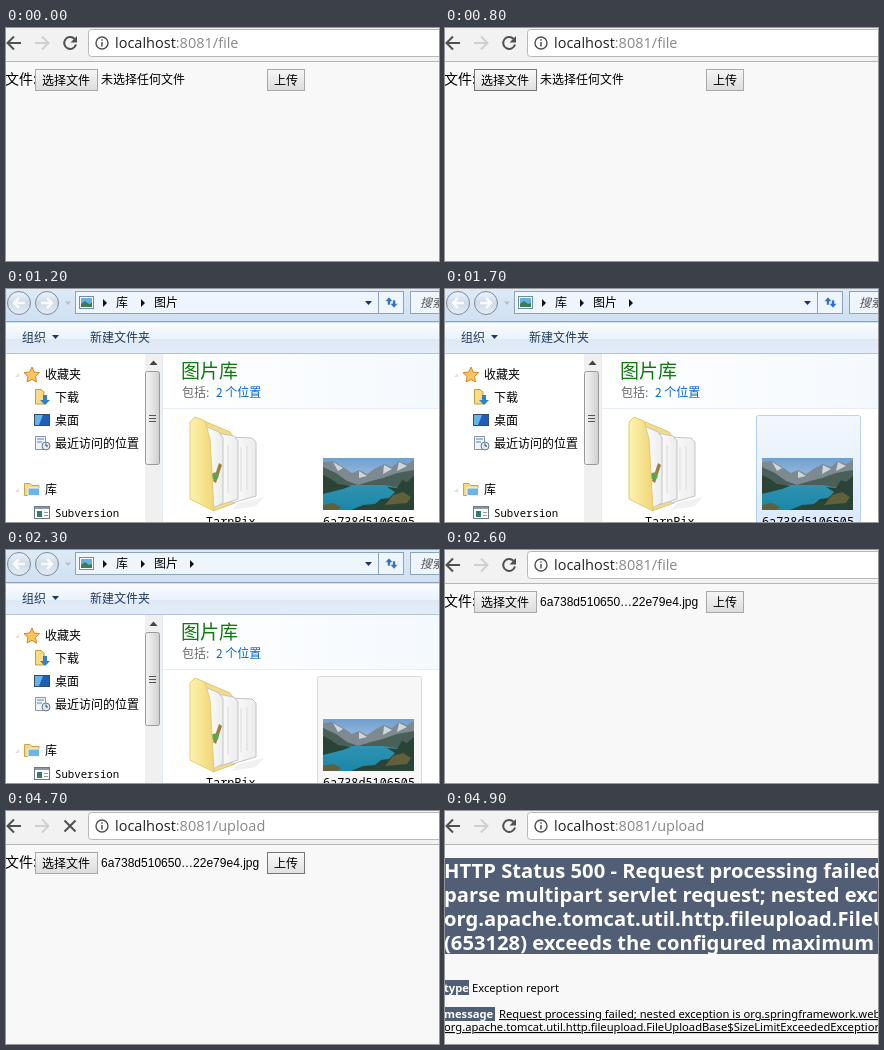
An HTML page for the animation above (6400 ms loop, 433x233 px).

```html
<!DOCTYPE html>
<html lang="zh-CN">
<head>
<meta charset="utf-8">
<title>File upload</title>
<style>
html, body { margin: 0; width: 100%; height: 100%; overflow: hidden; background: #f8f8f8; }
svg { display: block; width: 433px; height: 233px; }
text { font: 12px "Noto Sans CJK SC", "Noto Sans CJK", sans-serif; white-space: pre; }
.url text { font: 14.5px "Open Sans", "Noto Sans", sans-serif; }
.mono { font-family: "Noto Sans Mono", monospace; }
.line { fill: none; stroke: #505050; stroke-width: 2; }
.button rect { fill: url(#up); stroke: #a9a9a9; }
.button.hover rect { fill: url(#lit); stroke: #757575; }
.button.pressed rect { fill: url(#down); stroke: #757575; }
.error text { font: 11.2px "Noto Sans", "Open Sans", sans-serif; }
.error .title text { font-size: 20.2px; }
.error .head { font-weight: bold; fill: #fff; }
.error .under { text-decoration: underline; }
</style>
</head>
<body>
<svg viewBox="0 0 433 233">
  <defs>
    <linearGradient id="up" x2="0" y2="1"><stop stop-color="#f6f6f6"/><stop offset="1" stop-color="#dcdcdc"/></linearGradient>
    <linearGradient id="lit" x2="0" y2="1"><stop stop-color="#fafafa"/><stop offset="1" stop-color="#e0e0e0"/></linearGradient>
    <linearGradient id="down" x2="0" y2="1"><stop stop-color="#d4d4d4"/><stop offset="1" stop-color="#eee"/></linearGradient>
    <linearGradient id="glass" x2="0" y2="1"><stop stop-color="#dde9f6"/><stop offset="1" stop-color="#cfe0f2"/></linearGradient>
    <linearGradient id="ball" x2="0" y2="1"><stop stop-color="#eef3f9"/><stop offset=".5" stop-color="#cfdbe8"/><stop offset="1" stop-color="#e6eef6"/></linearGradient>
    <linearGradient id="bar" x2="0" y2="1"><stop stop-color="#fafcff"/><stop offset=".5" stop-color="#eaf2fb"/><stop offset=".52" stop-color="#dfe9f6"/><stop offset="1" stop-color="#e3edf9"/></linearGradient>
    <linearGradient id="paper"><stop stop-color="#fff"/><stop offset="1" stop-color="#f4f9fe"/></linearGradient>
    <linearGradient id="thumb"><stop stop-color="#f5f5f5"/><stop offset=".5" stop-color="#e3e3e3"/><stop offset="1" stop-color="#cfcfcf"/></linearGradient>
    <linearGradient id="folder"><stop stop-color="#fdf3ae"/><stop offset="1" stop-color="#f0d677"/></linearGradient>
    <linearGradient id="sheet"><stop stop-color="#fff"/><stop offset="1" stop-color="#ececec"/></linearGradient>
    <linearGradient id="picked" x2="0" y2="1"><stop stop-color="#f3f8fe"/><stop offset="1" stop-color="#d9e9fc"/></linearGradient>
    <linearGradient id="sky" x2="0" y2="1"><stop stop-color="#6f9fd0"/><stop offset="1" stop-color="#e2eaf0"/></linearGradient>
    <linearGradient id="lake" x2="0" y2="1"><stop stop-color="#2f93b0"/><stop offset="1" stop-color="#1b86a8"/></linearGradient>
  </defs>

  <!-- browser -->
  <rect width="433" height="233" fill="#f8f8f8"/>
  <rect width="433" height="33" fill="#f2f2f2"/>
  <path d="M0 33.5H433" stroke="#b5b5b5"/>
  <rect x="82.5" y="1.5" width="360" height="27" rx="3" fill="#fff" stroke="#b8b8b8"/>
  <path class="line" d="M15 15H2M8 8.500L1.500 15L8 21.500"/>
  <path class="line" d="M29 15H42M36 8.500L42.500 15L36 21.500" style="stroke:#d0d0d0"/>
  <g id="reload">
    <path class="line" d="M68.500 10.800A6 6 0 1 0 70 16.500"/>
    <path d="M71 8V14.500H64.500Z" fill="#505050"/>
  </g>
  <path id="stop" class="line" d="M58.500 9.500L69.500 20.500M69.500 9.500L58.500 20.500"/>
  <circle class="line" cx="96" cy="15" r="6" style="stroke-width:1.400"/>
  <path class="line" d="M96 11.300V12.800M96 14V18.600" style="stroke-width:1.500"/>
  <g class="url"><text x="109" y="20" fill="#222">localhost<tspan fill="#888">:8081/<tspan id="path">file</tspan></tspan></text></g>

  <!-- upload form -->
  <g id="form">
    <text x="-1" y="56" style="font-size:14px">文件:</text>
    <g id="choose" class="button"><rect x="29.500" y="41.500" width="62" height="21"/><text x="36" y="57">选择文件</text></g>
    <text id="none" x="95" y="56">未选择任何文件</text>
    <text id="chosen" x="95" y="56" style="font-family:'Liberation Sans',Arial,sans-serif">6a738d510650…22e79e4.jpg</text>
    <g id="send" class="button"><rect x="261.500" y="41.500" width="37" height="21"/><text x="268" y="57">上传</text></g>
  </g>

  <!-- error page -->
  <g id="error" class="error">
    <path d="M0 47H433V143H0ZM0 169H24V184H0ZM0 196H50V210H0Z" fill="#525d76"/>
    <g class="title">
      <text class="head" x="-1" y="67">HTTP Status 500 - Request processing failed; nested</text>
      <text class="head" x="-1" y="91">parse multipart servlet request; nested exception is</text>
      <text class="head" x="-1" y="115">org.apache.tomcat.util.http.fileupload.FileUploadBase</text>
      <text class="head" x="-1" y="139">(653128) exceeds the configured maximum (</text>
    </g>
    <text class="head" x="-1" y="181">type</text>
    <text x="27" y="181">Exception report</text>
    <text class="head" x="-1" y="207">message</text>
    <text class="under" x="54" y="207">Request processing failed; nested exception is org.springframework.web.multipart</text>
    <text class="under" x="-1" y="220">org.apache.tomcat.util.http.fileupload.FileUploadBase$SizeLimitExceededException:</text>
  </g>

  <!-- file dialog -->
  <g id="dialog">
    <rect width="433" height="233" fill="#fff"/>
    <rect width="433" height="34" fill="url(#glass)"/>
    <path d="M0 32.500H433" stroke="#8fa3ba"/>
    <g fill="url(#ball)" stroke="#7b8a9b">
      <circle cx="13" cy="14" r="11.500"/><circle cx="41" cy="14" r="11.500"/>
    </g>
    <path d="M19 14H8M13 9L8 14L13 19M35 14H46M41 9L46 14L41 19" fill="none" stroke="#f8fbfe" stroke-width="2.500"/>
    <path d="M59 12.500H65L62 16Z" fill="#b3c0ce"/>
    <g fill="#eef5fc" stroke="#8da3ba">
      <rect x="69.500" y="2.500" width="303" height="22"/>
      <rect x="372.500" y="2.500" width="25" height="22"/>
      <rect x="404.500" y="2.500" width="40" height="22"/>
    </g>
    <rect x="73.500" y="7.500" width="14" height="12" fill="#fff" stroke="#6f8ca8"/>
    <path d="M75 9H86V18H75Z" fill="#68b0e0"/><path d="M75 18V15L79 12L83 15L86 14V18Z" fill="#397d50"/>
    <path d="M97 10V18L101 14ZM135 10V18L139 14Z" fill="#111"/>
    <path d="M359 12H366L362.500 16Z" fill="#1c2f6b"/>
    <path id="crumb" d="M184 10V18L188 14Z" fill="#111"/>
    <text x="110" y="18">库</text><text x="148" y="18">图片</text>
    <path d="M383 8L387 12.500H384.500V16H381.500V12.500H379ZM388 19L384 14.500H386.500V11H389.500V14.500H392Z" fill="#2e72c4" stroke="#eef5fc" stroke-width=".6"/>
    <text transform="translate(414 18) skewX(-14)" fill="#555">搜索 图片</text>

    <rect y="34" width="433" height="31" fill="url(#bar)"/>
    <path d="M0 64.500H433" stroke="#b4c3d6"/>
    <g fill="#1e395b"><text x="16" y="53">组织</text><text x="84" y="53">新建文件夹</text><path d="M46 46H53L49.500 50Z"/></g>

    <path d="M9 88L13 84V88ZM9 203L13 199V203Z" fill="#e0e0e0"/>
    <path d="M26 78L28 83L33.500 83.700L29.500 87.500L30.500 93L26 90.400L21 93L22 87.500L18 83.700L23.700 83Z" fill="#fbc45c" stroke="#d9822b"/>
    <text x="39" y="90">收藏夹</text><text x="49" y="113">下载</text><text x="49" y="136">桌面</text><text x="49" y="159">最近访问的位置</text>
    <path d="M29.500 100.500H35L38 103V115H29.500Z" fill="#f7dc85" stroke="#c79d3c"/>
    <path d="M37 106H41V111H44L39 116L34 111H37Z" fill="#2d82d0"/>
    <rect x="28.500" y="125.500" width="15" height="11" fill="#1f5fb5" stroke="#344e68"/><path d="M29 126H37L33 136H29Z" fill="#64b4ea"/>
    <path d="M29.500 147.500H39.500V160.500H29.500Z" fill="#eef3f8" stroke="#8597a8"/>
    <path d="M31 150H38M31 153H36" stroke="#5787b5"/><circle cx="40" cy="157" r="4" fill="#dfeaf4" stroke="#67798c"/><path d="M40 154.500V157H42" fill="none" stroke="#345"/>
    <path d="M18.500 194.500H24L26 196.500H33V206.500H18.500Z" fill="#f3d888" stroke="#c8a650"/><path d="M22 199H33.500V206.500H22Z" fill="#6db5e4" stroke="#eef7fd"/>
    <text x="39" y="205">库</text>
    <rect x="28.500" y="217.500" width="15" height="12" fill="#fff" stroke="#6c7a88"/><path d="M29 218H43V220H29Z" fill="#8a98a8"/><path d="M31 222H36V228H31Z" fill="#397a68"/><path d="M38 223.500H42M38 226.500H42" stroke="#999"/>
    <text class="mono" x="49" y="228" style="font-size:10.700px">Subversion</text>

    <rect x="139" y="65" width="17" height="168" fill="#f0f0f0"/>
    <path d="M143.500 76H151.500L147.500 71.500Z" fill="#444"/>
    <rect x="139.500" y="82.500" width="14" height="93" rx="2" fill="url(#thumb)" stroke="#999"/>
    <path d="M143 126.500H150M143 129.500H150M143 132.500H150" stroke="#555"/>
    <path d="M156.500 65V233" stroke="#e3eaf2"/>

    <rect x="157" y="65" width="276" height="55" fill="url(#paper)"/>
    <path d="M157 119.500H433" stroke="#e6edf5"/>
    <text x="175" y="89" fill="#107a10" style="font-size:19px">图片库</text>
    <text x="176" y="108" fill="#6a6a6a">包括:</text><text x="210" y="108" fill="#0066cc">2 个位置</text>

    <path d="M232 214L258 208L250 217L226 221Z" fill="#f1f1f1"/>
    <path d="M198 132L224 143L229 150V214L207 222Z" fill="#f3dc88" stroke="#dfc578"/>
    <g fill="url(#sheet)" stroke="#c4c4c4">
      <path d="M222 148L246 149L250 153V207L226 214Z"/>
      <path d="M211 144L228 147L232 152V210L214 216Z"/>
      <path d="M199 137L213 143L217 149V214L207 219Z"/>
    </g>
    <path d="M235 158V202M241 157V201M222 156V204" stroke="#dadada"/>
    <path d="M207 192L213 174L216 176L210 194Z" fill="#9a8042"/><circle cx="209" cy="187" r="3.500" fill="#5aa552"/>
    <path d="M184 133L189 128L199 132L204 150L208 222L184 210Z" fill="url(#folder)" stroke="#e5ca74"/>
    <text class="mono" x="200" y="237" style="font-size:11.800px">TarnPix</text>

    <rect id="pick" x="311.500" y="126.500" width="104" height="112" rx="2"/>
    <svg x="317" y="169" width="91" height="52" viewBox="0 0 91 52">
      <rect width="91" height="52" fill="url(#sky)"/>
      <path d="M0 4L10 3L20 9L29 15L36 12L44 16L53 10L61 6L69 9L76 3L84 6L91 2V34H0Z" fill="#7d8a92"/>
      <path d="M10 4L20 10L15 13ZM36 13L44 18L36 20ZM61 7L69 11L60 16ZM76 4L84 8L74 13Z" fill="#ced7dc"/>
      <path d="M0 9L13 15L24 23L35 27L48 23L60 20L74 15L91 12V36H0Z" fill="#4a5f58"/>
      <path d="M0 30L30 27L60 27L91 32V52H0Z" fill="url(#lake)"/>
      <path d="M0 17L8 21L15 26L28 28L20 31L0 36ZM91 18L84 24L79 22L74 30L64 29L72 34L66 40L58 41L52 46L40 47L28 52H91Z" fill="#2a4337"/>
      <path d="M70 37L80 34L88 39L84 45L62 47ZM0 47L10 45L18 49L15 52H0Z" fill="#60603a"/>
    </svg>
    <text class="mono" x="317" y="237" style="font-size:11.800px">6a738d5106505</text>
  </g>
</svg>
<script>
const LOOP = 6400;
const $ = id => document.getElementById(id);
const show = (id, on) => $(id).setAttribute("visibility", on ? "visible" : "hidden");

// Value of the last step reached; steps are [time, value] pairs.
const at = (t, ...steps) => steps.filter(([start]) => t >= start).pop()[1];

function draw(t) {
  const failed = t >= 4900, picked = t >= 2600;
  const loading = t >= 4400 && !failed;

  show("form", !failed);
  show("error", failed);
  show("none", !picked && !failed);
  show("chosen", picked && !failed);
  show("reload", !loading);
  show("stop", loading);
  show("crumb", t >= 1300);
  $("path").textContent = t < 4700 ? "file" : "upload";

  $("choose").setAttribute("class", "button " +
    at(t, [0, ""], [500, "hover"], [700, "pressed"], [800, "hover"], [2600, ""]));
  $("send").setAttribute("class", "button " +
    at(t, [0, ""], [3700, "hover"], [4300, "pressed"], [4400, "hover"]));

  const fade = at(t, [0, 0], [1100, .5], [1200, 1], [2500, .5], [2600, 0]);
  $("dialog").setAttribute("opacity", fade);
  $("pick").setAttribute("fill", at(t, [0, "none"], [1700, "url(#picked)"], [2300, "#f7f7f7"]));
  $("pick").setAttribute("stroke", at(t, [0, "none"], [1700, "#b5d4f5"], [2300, "#d9d9d9"]));
}

const start = performance.now();
function tick() {
  draw((performance.now() - start) % LOOP);
  requestAnimationFrame(tick);
}
tick();
</script>
</body>
</html>
```
